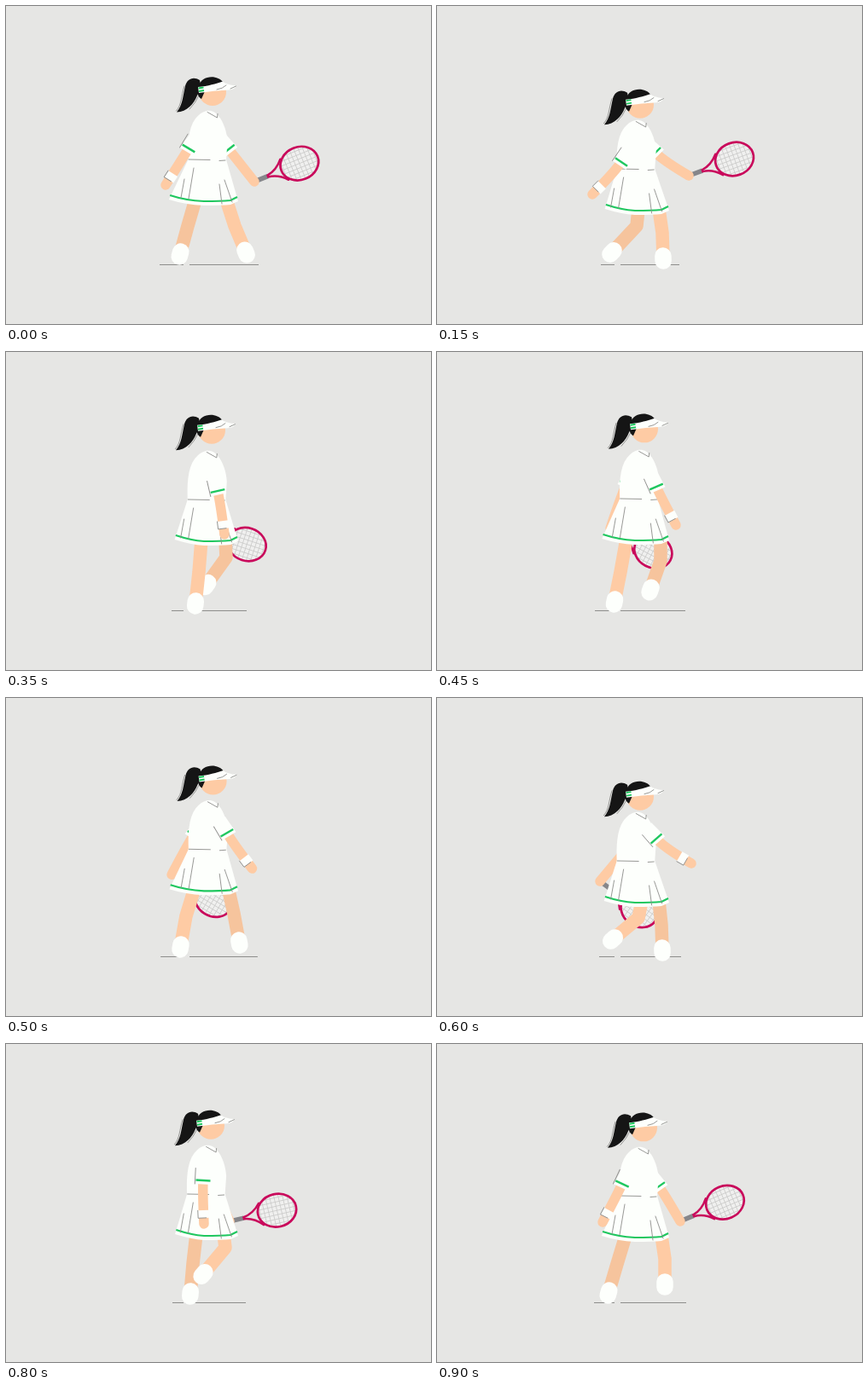
Recreate the animation shown at these times as an HTML page with a canvas. Size 498 by 373 pixels, loop 950 ms.

```html
<!DOCTYPE html>
<html lang="en">
<head>
<meta charset="utf-8">
<title>Tennis walk</title>
<style>
html, body { margin: 0; width: 100%; height: 100%; overflow: hidden; background: #e6e6e4; }
canvas { display: block; width: 498px; height: 373px; }
</style>
</head>
<body>
<canvas id="stage" width="498" height="373"></canvas>
<script>
const ctx = document.getElementById('stage').getContext('2d');
const LOOP = 950, STEP = 50;
const BG = '#e6e6e4', WHITE = '#fdfffc', GREEN = '#1fc75f', BLACK = '#151515', LINE = '#8d8d8b';
const SKIN = '#fecba4', SHADE = '#f6c49d', PINK = '#c9095b', GRIP = '#86868a';

// Key poses of the walk; every channel holds one value per key time.
const KEYS = [0, 150, 350, 450, 520, 600, 800, 900];
const BODY = {
  x: [0, -4, -1, 1, 0, -4, -2, 0],
  y: [0, 11, -7, -8, 0, 11, -4, -2],
  ground: [58, 46, 44, 53, 57, 48, 43, 54]
};
const NEAR_ARM = {
  x: [214, 216, 248, 257, 259, 257, 231, 217],
  y: [167, 183, 163, 158, 159, 165, 160, 164],
  turn: [31, 34, -13, -24, -33, -41, 3, 25],
  handX: [187, 182, 256, 280, 291, 298, 232, 194],
  handY: [210, 221, 214, 203, 199, 194, 211, 209]
};
const FAR_ARM = {
  x: [261, 256, 235, 222, 220, 222, 245, 260],
  y: [168, 172, 162, 155, 164, 178, 166, 167],
  turn: [-38, -45, 0, 25, 35, 40, -15, -35],
  handX: [291, 295, 228, 203, 192, 191, 262, 285],
  handY: [206, 199, 208, 207, 208, 215, 208, 208],
  racket: [-22, -20, 18, 28, 32, 36, -13, -23]
};
const NEAR_LEG = {
  hip: [258, 260, 229, 222, 222, 240, 255, 263],
  kneeX: [268, 264, 226, 215, 212, 236, 257, 267],
  kneeY: [258, 266, 258, 258, 256, 258, 239, 252],
  footX: [281, 265, 222, 208, 204, 206, 231, 267],
  footY: [289, 296, 295, 293, 291, 283, 270, 282]
};
const FAR_LEG = {
  hip: [222, 236, 257, 262, 260, 260, 223, 221],
  kneeX: [213, 234, 258, 262, 268, 263, 219, 211],
  kneeY: [258, 258, 241, 245, 256, 266, 258, 258],
  footX: [204, 205, 235, 250, 279, 264, 216, 201],
  footY: [291, 289, 273, 279, 290, 296, 293, 292]
};

// Smooth periodic curve through the keys.
function sample(values, t) {
  const n = KEYS.length;
  const wrap = i => (i + n) % n;
  const time = i => KEYS[wrap(i)] + Math.floor(i / n) * LOOP;
  const value = i => values[wrap(i)];
  const slope = i => (value(i + 1) - value(i - 1)) / (time(i + 1) - time(i - 1));
  let i = n - 1;
  while (KEYS[i] > t) i--;
  const span = time(i + 1) - time(i), u = (t - time(i)) / span;
  const u2 = u * u, u3 = u2 * u;
  return value(i) * (2 * u3 - 3 * u2 + 1) + value(i + 1) * (3 * u2 - 2 * u3) +
    span * (slope(i) * (u3 - 2 * u2 + u) + slope(i + 1) * (u3 - u2));
}

function pose(part, t) {
  const out = {};
  for (const key in part) out[key] = sample(part[key], t);
  return out;
}

const rad = deg => deg * Math.PI / 180;

function fill(path, color) {
  ctx.fillStyle = color;
  ctx.fill(new Path2D(path));
}

function stroke(path, color = LINE, width = 0.9, cap = 'round') {
  ctx.strokeStyle = color;
  ctx.lineWidth = width;
  ctx.lineCap = cap;
  ctx.lineJoin = 'round';
  ctx.stroke(new Path2D(path));
}

function at(x, y, angle, draw) {
  ctx.save();
  ctx.translate(x, y);
  ctx.rotate(angle);
  draw();
  ctx.restore();
}

function ground(half) {
  stroke(`M${238 - half} 303.5H208M215 303.5H${238 + half}`, LINE, 1.1, 'butt');
}

function leg(l, hipY, skin) {
  stroke(`M${l.hip} ${hipY}L${l.kneeX} ${l.kneeY}L${l.footX} ${l.footY}`, skin, 15.5);
  const shin = Math.atan2(l.footY - l.kneeY, l.footX - l.kneeX);
  at(l.footX, l.footY, shin, () => stroke('M-3 0H3', WHITE, 19.5));
}

function racket(x, y, angle) {
  at(x, y, angle, () => {
    stroke('M3 0H17', GRIP, 5.5, 'butt');
    stroke('M17 -1C25 -2 32 -6 38 -13M17 1C25 2 32 6 38 13', PINK, 2.5);
    ctx.save();
    ctx.beginPath();
    ctx.ellipse(57, 0, 23, 19.5, 0, 0, 7);
    ctx.fillStyle = '#f0f0ef';
    ctx.fill();
    ctx.clip();
    let grid = '';
    for (let i = -20; i <= 20; i += 5) grid += `M${57 + i} -20V20M34 ${i}H80`;
    stroke(grid, '#cbcbca', 0.8);
    ctx.restore();
    ctx.beginPath();
    ctx.ellipse(57, 0, 22.8, 19.3, 0, 0, 7);
    ctx.strokeStyle = PINK;
    ctx.lineWidth = 2.7;
    ctx.stroke();
  });
}

function arm(a, skin, band) {
  const turn = rad(a.turn);
  const bendX = a.x - Math.sin(turn) * 14, bendY = a.y + Math.cos(turn) * 14;
  stroke(`M${a.x} ${a.y}Q${bendX} ${bendY} ${a.handX} ${a.handY}`, skin, 11.5);
  if (band) {
    at(a.handX, a.handY, Math.atan2(a.handY - bendY, a.handX - bendX), () => {
      fill('M-16 -6.5H-7V6.5H-16Z', WHITE);
      stroke('M-16 6.5H-7V-3');
    });
  }
  at(a.x, a.y, turn, () => {
    fill('M-9.5 4.5H9.5L8 -18H-7Z', WHITE);
    stroke('M-8.5 0H8.5', GREEN, 2.4, 'butt');
    if (band) stroke('M-9.5 4.5V-14');
  });
}

function skirt(x, y, half) {
  const left = 220 - half * 0.48;
  const hem = d => `${left - d / 4} ${y + 42 + d}Q${left + 18} ${y + 48 + d} 232 ${y + 49 + d}` +
    `Q252 ${y + 49 + d} 263 ${y + 48 + d}L${271 + d / 5} ${y + 44 + d}`;
  fill(`M${213.5 + x} ${y}L${hem(5)}L${258 + x} ${y}Z`, WHITE);
  stroke('M' + hem(0), GREEN, 2.2, 'butt');
  at(x * 0.5, y, 0, () =>
    stroke('M220 10L214 46M209 23L205 45M250 29L253 52M256 24L265 50'));
}

function torso(x, y) {
  at(x, y, 0, () => {
    fill('M235 123C241 122 246 125 249 129C255 136 259 148 259.5 159L258 181H213.5' +
      'C213 164 213 144 222 132C226 127 230 124 235 123Z', WHITE);
    stroke('M214 180L239 180.5M250 181.5L257 181M236 124.5L247.5 131L248 126.5');
  });
}

function head(x, y) {
  at(x, y, 0, () => {
    fill('M227 87C219 82 212 86 210 94C207 107 207 116 200 124.5C212 124 220 115 224 105L229 96Z', BLACK);
    stroke('M209 94C205 106 206 116 199.5 123M226 105Q222 114 215 121');
    ctx.beginPath();
    ctx.arc(242, 101, 16, 0, 7);
    ctx.fillStyle = SKIN;
    ctx.fill();
    fill('M226 94C228 82 247 79 255 90L242 97L233 100L229 109C225 107 223 101 226 94Z', BLACK);
    fill('M225 95C237 94 246 91 254 88.5Q257 92 270 93.5Q268 98 261 98.5Q244 99 226 102Z', WHITE);
    stroke('M247 98Q254 97 258 93M263 97L269.5 94');
    stroke('M225.5 96.5L231.5 95.5M226 100L232 99', GREEN, 2, 'butt');
  });
}

function draw(t) {
  const body = pose(BODY, t);
  const far = pose(FAR_ARM, t);
  const waist = 180 + body.y, hipY = waist + 47;
  ctx.fillStyle = BG;
  ctx.fillRect(0, 0, 498, 373);
  ground(body.ground);
  racket(far.handX, far.handY, rad(far.racket));
  arm(far, SKIN, false);
  leg(pose(FAR_LEG, t), hipY, SHADE);
  leg(pose(NEAR_LEG, t), hipY, SKIN);
  skirt(body.x * 0.7, waist, body.ground);
  torso(body.x * 0.7, body.y);
  arm(pose(NEAR_ARM, t), SKIN, true);
  head(body.x, body.y * 1.33);
}

const start = performance.now();
function tick() {
  const t = (performance.now() - start) % LOOP;
  draw(Math.floor(t / STEP) * STEP);
  requestAnimationFrame(tick);
}
tick();
</script>
</body>
</html>
```
